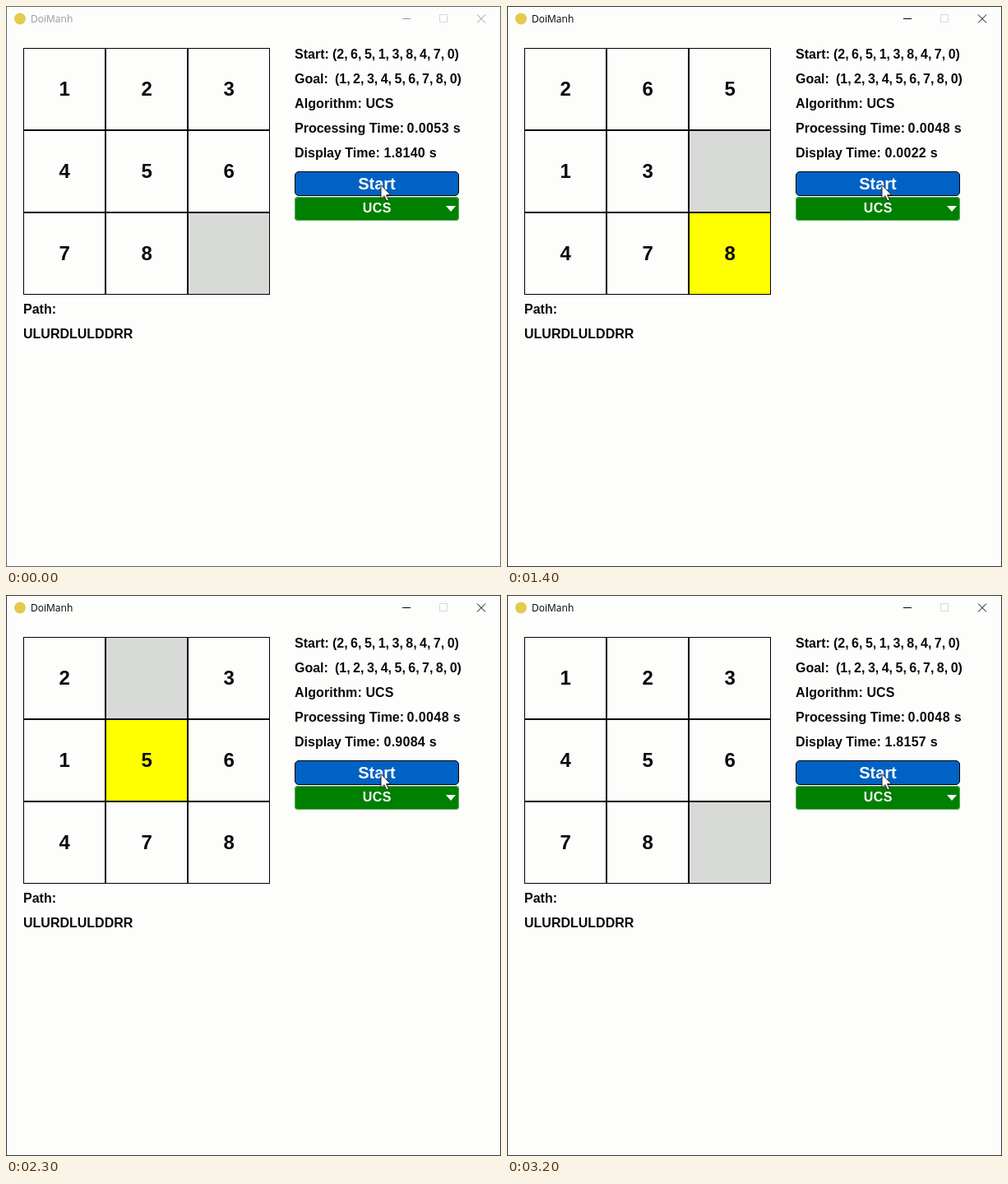
Write an HTML page that moves like this. It is 602 by 682 pixels and loops after 3.6 s.

```html
<!DOCTYPE html>
<html lang="vi">
<head>
<meta charset="utf-8">
<title>DoiManh</title>
<style>
  html, body { margin: 0; width: 100%; height: 100%; overflow: hidden; background: #fdfefc; }
  svg { display: block; width: 602px; height: 682px; }
  text { font: bold 16px "Liberation Sans", Arial, sans-serif; fill: #0a0a0a; white-space: pre; }
  .caption { font: 12px "Open Sans", sans-serif; }
  .list { word-spacing: -1px; }
  .tile { font-size: 24px; text-anchor: middle; }
  .button { fill: #fff; text-anchor: middle; }
</style>
</head>
<body>
<svg viewBox="0 0 602 682">
  <rect width="602" height="682" fill="#fdfefc"/>
  <rect id="frame" x=".5" y=".5" width="601" height="681" fill="none"/>

  <circle cx="17" cy="15.5" r="7" fill="#e3cb50"/>
  <text id="caption" class="caption" x="30" y="20">DoiManh</text>
  <path id="controls" d="M482 15.5h10M573 10.5l10 10m0-10l-10 10" fill="none"/>
  <rect x="527.5" y="10.5" width="9" height="9" fill="none" stroke="#d8d8d8"/>

  <g id="board"></g>

  <text x="351" y="64">Start:</text>
  <text x="397" y="64" class="list">(2, 6, 5, 1, 3, 8, 4, 7, 0)</text>
  <text x="351" y="94">Goal:</text>
  <text x="400" y="94" class="list">(1, 2, 3, 4, 5, 6, 7, 8, 0)</text>
  <text x="351" y="124" letter-spacing=".1">Algorithm: UCS</text>
  <text x="351" y="154">Processing Time:</text>
  <text id="processing" x="487.6" y="154" letter-spacing=".4"></text>
  <text x="351" y="184">Display Time:</text>
  <text id="display" x="459.5" y="184" letter-spacing=".25"></text>
  <text x="21" y="374">Path:</text>
  <text id="path" x="21" y="404"></text>

  <rect x="351.5" y="201.5" width="199" height="29" rx="4.5" fill="#0062c4" stroke="#000"/>
  <text class="button" x="451" y="223" style="font-size:20px">Start</text>
  <rect x="351" y="232" width="200" height="29" rx="4" fill="#008000"/>
  <rect x="351.5" y="232.5" width="199" height="28" rx="4" fill="none" stroke="#8fc48f" stroke-width=".6"/>
  <text class="button" x="451.3" y="251" letter-spacing=".4">UCS</text>
  <path d="M535 243h12l-6 7z" fill="#fff"/>
  <path d="M456 217.5v17l4-3.8 2.8 6.3 2.6-1.1-2.8-6.2h5.2z" fill="#fff" stroke="#111" stroke-width=".9"/>
</svg>
<script>
const LOOP = 3600, TICK = 100, FOCUS_AT = 600, RUN_AT = 1300, STEP = 151;
const PATH = "ULURDLULDDRR";
const OFFSET = { U: -3, D: 3, L: -1, R: 1 };
const START = [2, 6, 5, 1, 3, 8, 4, 7, 0];
const GOAL = [1, 2, 3, 4, 5, 6, 7, 8, 0];

const $ = id => document.getElementById(id);

function add(tag, attrs) {
  const el = document.createElementNS("http://www.w3.org/2000/svg", tag);
  for (const key in attrs) el.setAttribute(key, attrs[key]);
  return $("board").appendChild(el);
}

const cells = GOAL.map((_, i) => {
  const x = 21 + i % 3 * 100, y = 51 + Math.floor(i / 3) * 100;
  return {
    box: add("rect", { x: x + .5, y: y + .5, width: 99, height: 99, stroke: "#000" }),
    label: add("text", { class: "tile", x: x + 50.3, y: y + 58 })
  };
});

// Slide tiles along the path; returns the board and the tile moved last.
function slide(count) {
  const board = [...START];
  let blank = board.indexOf(0), moved = 0;
  for (const move of PATH.slice(0, count)) {
    const next = blank + OFFSET[move];
    moved = board[blank] = board[next];
    board[next] = 0;
    blank = next;
  }
  return { board, moved };
}

function drawBoard({ board, moved }) {
  board.forEach((n, i) => {
    const fill = n === 0 ? "#d8dad7" : n === moved ? "#ff0" : "#fdfefc";
    cells[i].box.setAttribute("fill", fill);
    cells[i].label.textContent = n || "";
  });
}

function render(ms) {
  const t = Math.floor(ms % LOOP / TICK) * TICK;
  const focused = t >= FOCUS_AT, running = t >= RUN_AT;
  const step = Math.min(PATH.length + 1, Math.floor((t - RUN_AT) / STEP) + 1);
  const done = step > PATH.length;

  $("frame").setAttribute("stroke", focused ? "#333" : "#666");
  $("caption").style.fill = focused ? "#000" : "#999";
  $("controls").setAttribute("stroke", focused ? "#000" : "#999");

  drawBoard(running && !done ? slide(step) : { board: GOAL, moved: 0 });
  const elapsed = running ? .00223 + (step - 1) * .15103 + (done ? .0011 : 0) : 1.814;
  $("processing").textContent = (running ? "0.0048" : "0.0053") + " s";
  $("display").textContent = elapsed.toFixed(4) + " s";
}

$("path").textContent = PATH;
const began = performance.now();
function loop() {
  render(performance.now() - began);
  requestAnimationFrame(loop);
}
loop();
</script>
</body>
</html>
```
